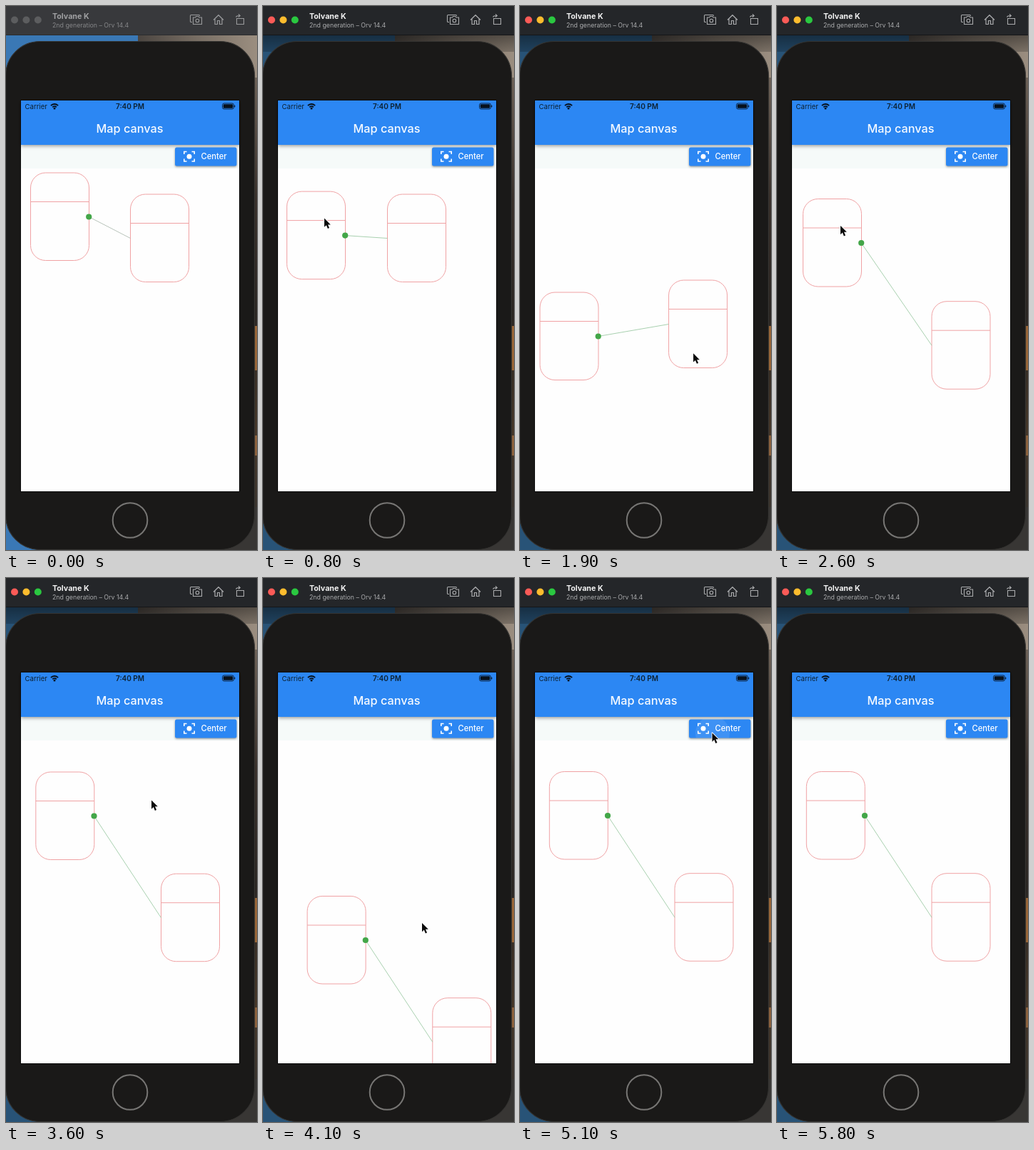
Recreate the animation shown at these times as an HTML page with a canvas. Size 352x760 px, loop 6.4 s.

```html
<!DOCTYPE html>
<html lang="en">
<head>
<meta charset="utf-8">
<title>Map canvas</title>
<style>
html, body { margin: 0; width: 100%; height: 100%; overflow: hidden; background: #1a1918; }
canvas { display: block; width: 352px; height: 760px; }
</style>
</head>
<body>
<canvas id="stage" width="352" height="760"></canvas>
<script>
const ctx = document.getElementById('stage').getContext('2d');
const LOOP = 6400, STEP = 100;
const FOCUS_AT = 800, CENTER_AT = 5000;
const NODE = { w: 82, h: 122.5, r: 21, divider: 40.5, port: 61.5 };

// Each track is a list of [time, x, y], eased between neighbours.
const nodeA = [[700, 34.5, 233], [1100, 28, 400], [2300, 28, 400], [2600, 36.5, 269.5], [2800, 41.3, 270.5]];
const nodeB = [[1400, 174.5, 263], [2100, 217, 412.7]];
const pan = [[3500, 0, 0], [3600, .5, .5], [4100, 20.8, 174], [4200, 21, 176]];
const pointer = [
  [100, 345, 590], [600, 87, 270.5], [700, 87, 270.5], [1100, 80.5, 437.5], [1300, 209, 365.5],
  [1400, 209, 365.5], [2100, 251.5, 515], [2300, 80.5, 437.5], [2600, 89, 307], [2800, 94, 308],
  [2900, 94, 308], [3500, 204, 310.5], [3600, 204, 310.5], [4100, 223, 482], [4200, 223, 484],
  [4400, 223, 484], [4900, 269.5, 216.5], [5200, 269.5, 216.5], [5600, 180, 400], [5700, 150, 370]
];

function along(track, t) {
  const i = track.findIndex(key => key[0] > t);
  if (i < 0) return track[track.length - 1].slice(1);
  if (i === 0) return track[0].slice(1);
  const [t0, x0, y0] = track[i - 1], [t1, x1, y1] = track[i];
  const u = (t - t0) / (t1 - t0), e = u * u * (3 - 2 * u);
  return [x0 + (x1 - x0) * e, y0 + (y1 - y0) * e];
}

function rect(x, y, w, h, color) {
  ctx.fillStyle = color;
  ctx.fillRect(x, y, w, h);
}

function rounded(x, y, w, h, r) {
  ctx.beginPath();
  ctx.roundRect(x, y, w, h, r);
}

function disc(x, y, r, color) {
  ctx.fillStyle = color;
  ctx.beginPath();
  ctx.arc(x, y, r, 0, Math.PI * 2);
  ctx.fill();
}

function stroke(path, color, width) {
  ctx.strokeStyle = color;
  ctx.lineWidth = width;
  ctx.stroke(new Path2D(path));
}

function label(text, x, y, size, weight, color, align = 'left') {
  ctx.font = `${weight} ${size}px Inter, sans-serif`;
  ctx.textAlign = align;
  ctx.fillStyle = color;
  ctx.fillText(text, x, y);
}

function gradient(x0, y0, x1, y1, ...stops) {
  const g = ctx.createLinearGradient(x0, y0, x1, y1);
  stops.forEach((color, i) => g.addColorStop(i / (stops.length - 1), color));
  return g;
}

function shadowed(color, blur, dy, draw) {
  ctx.save();
  ctx.shadowColor = color;
  ctx.shadowBlur = blur;
  ctx.shadowOffsetY = dy;
  draw();
  ctx.restore();
}

function drawWallpaper(focused) {
  rect(0, 40, 185, 720, focused ? '#285377' : '#3a78b5');
  rect(185, 40, 167, 80, gradient(185, 0, 352, 0, '#4b4540', '#786e64', '#9b8e80'));
  rect(340, 100, 12, 660, gradient(0, 100, 0, 760, '#6e6258', '#39302b', '#2a2522', '#453628', '#333130'));
  rect(347, 447, 5, 62, '#9a6638');
  rect(347, 600, 5, 28, '#8d623d');
  rect(185, 700, 167, 60, '#383634');
  if (focused) rect(0, 40, 352, 24, gradient(0, 40, 0, 64, 'rgba(0,0,0,.45)', 'rgba(0,0,0,.2)'));
}

function drawTitleBar(focused) {
  rect(0, 0, 352, 41, focused ? '#242629' : '#38393c');
  rect(0, 40, 352, 1, focused ? '#151618' : '#2b2c2e');
  const lights = focused ? ['#fc5b57', '#fdbc2e', '#2ac840'] : ['#5c5d5f', '#5c5d5f', '#5c5d5f'];
  lights.forEach((color, i) => disc(12 + i * 16.4, 19.5, 5, color));
  label('Tolvane K', 65, 18, 10.7, 700, focused ? '#f2f2f2' : '#a0a1a3');
  label('2nd generation – Orv 14.4', 65, 30, 8.8, 400, focused ? '#a9aaac' : '#858688');

  const tint = focused ? '#a9aaac' : '#98999b';
  stroke('M261 22.5H259.5Q258.5 22.5 258.5 21.5V13.5Q258.5 12.5 259.5 12.5H270.5Q271.5 12.5 271.5 14', tint, 1.1);
  stroke('M262.5 16H265.5L266.5 14.5H270L271 16H274.5V25.5H262.5Z', tint, 1.1);
  stroke('M270.7 20.5a2.3 2.3 0 1 1-4.6 0a2.3 2.3 0 1 1 4.6 0', tint, 1.1);
  stroke('M291 19.5L298 12.7L305 19.5M293 18V25.5H296.5V20.5H299.5V25.5H303V18', tint, 1.2);
  stroke('M323.5 17.5H333.5V25.5H323.5ZM322.5 15.5Q323.5 13.2 328 13.5M326 11.5L328.3 13.5L326 15.5', tint, 1.1);
}

function drawPhone() {
  rounded(-.5, 49.5, 349, 710, 48);
  ctx.fillStyle = '#1a1918';
  ctx.fill();
  ctx.strokeStyle = '#343331';
  ctx.lineWidth = 1.2;
  ctx.stroke();
  ctx.strokeStyle = '#777674';
  ctx.lineWidth = 2;
  ctx.beginPath();
  ctx.arc(174, 718.5, 24.3, 0, Math.PI * 2);
  ctx.stroke();
  rect(20, 131, 308, 548, '#0d0d0d');
  rect(21, 132, 306, 546, '#fefefe');
}

function drawAppBar() {
  rect(21, 194, 306, 33, '#f6faf9');
  shadowed('rgba(0,0,0,.4)', 5, 1.5, () => rect(21, 132, 306, 62, '#2c87f3'));
  label('Carrier', 26.5, 143.7, 9.6, 400, '#0c2030');
  label('7:40 PM', 174, 143.7, 10, 600, '#0c2030', 'center');
  label('Map canvas', 173.5, 177, 16.3, 500, '#f6faff', 'center');

  ctx.strokeStyle = '#07111c';
  ctx.lineWidth = 1.8;
  for (const r of [3.8, 7]) {
    ctx.beginPath();
    ctx.arc(68, 144, r, -Math.PI * .76, -Math.PI * .24);
    ctx.stroke();
  }
  disc(68, 143.2, 1.4, '#07111c');

  rounded(303.5, 136, 16, 8, 2.4);
  ctx.lineWidth = .8;
  ctx.stroke();
  rounded(304.7, 137.2, 13.6, 5.6, 1.4);
  ctx.fillStyle = '#07111c';
  ctx.fill();
  rect(320.3, 138.7, 1, 2.6, '#07111c');
}

function drawButton(t) {
  shadowed('rgba(0,0,0,.4)', 3, 1.2, () => {
    rounded(237, 197.5, 86.5, 26, 2.5);
    ctx.fillStyle = '#2c87f3';
    ctx.fill();
  });
  if (t >= CENTER_AT && t < CENTER_AT + 300) {
    ctx.save();
    rounded(237, 197.5, 86.5, 26, 2.5);
    ctx.clip();
    disc(270, 217, 14 + (t - CENTER_AT) * .1, 'rgba(255,255,255,.09)');
    ctx.restore();
  }
  stroke('M249.8 207V203.5H253.5M260.5 203.5H264.2V207M264.2 213.5V217H260.5M253.5 217H249.8V213.5', '#fff', 1.6);
  disc(257, 210.3, 3.5, '#fff');
  label('Center', 291.5, 214.3, 11.2, 500, '#fff', 'center');
}

function drawNode(x, y) {
  ctx.strokeStyle = '#f0a2a4';
  ctx.lineWidth = 1;
  rounded(x, y, NODE.w, NODE.h, NODE.r);
  ctx.stroke();
  stroke(`M${x} ${y + NODE.divider}h${NODE.w}`, '#f0a2a4', 1);
}

function drawMap(t) {
  const [dx, dy] = t < CENTER_AT ? along(pan, t) : [0, 0];
  const [a, b] = [nodeA, nodeB].map(track => {
    const [x, y] = along(track, t);
    return [x + dx, y + dy];
  });
  const port = [a[0] + NODE.w - .3, a[1] + NODE.port];
  ctx.save();
  ctx.beginPath();
  ctx.rect(21, 227, 306, 451);
  ctx.clip();
  drawNode(...a);
  drawNode(...b);
  stroke(`M${port}L${b[0]} ${b[1] + NODE.port}`, t < FOCUS_AT ? '#b0bdb3' : '#9fcba6', .9);
  disc(...port, 4.1, '#43a648');
  ctx.restore();
}

function drawPointer(t) {
  if (t < 100 || t >= 5800) return;
  const [x, y] = along(pointer, t);
  const arrow = new Path2D('M0 0V12.2L2.8 9.6L4.9 14.4L7 13.5L5 8.8H8.8Z');
  ctx.save();
  ctx.translate(x, y);
  ctx.lineJoin = 'round';
  ctx.strokeStyle = '#fff';
  ctx.lineWidth = 1.8;
  ctx.stroke(arrow);
  ctx.fillStyle = '#0a0a0a';
  ctx.fill(arrow);
  ctx.restore();
}

function render(now) {
  const t = Math.floor(now % LOOP / STEP) * STEP;
  const focused = t >= FOCUS_AT;
  drawWallpaper(focused);
  drawTitleBar(focused);
  drawPhone();
  drawAppBar();
  drawButton(t);
  drawMap(t);
  drawPointer(t);
}

const start = performance.now();
function tick() {
  render(performance.now() - start);
  requestAnimationFrame(tick);
}
tick();
</script>
</body>
</html>
```
